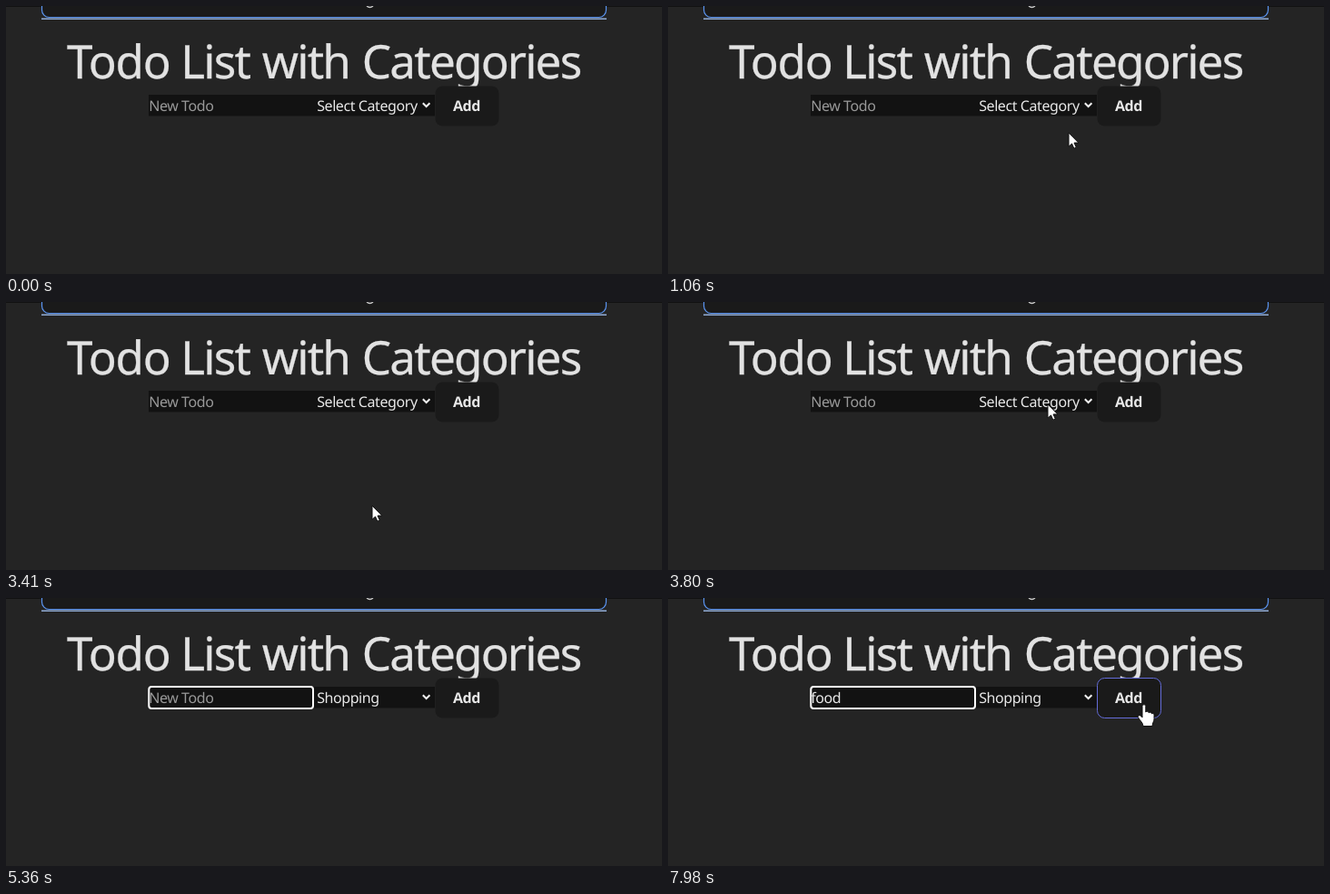
An HTML page for the animation above (8000 ms loop, 722 px wide and 296 px high).

```html
<!DOCTYPE html>
<html lang="en">
<head>
<meta charset="utf-8">
<title>Todo List with Categories</title>
<style>
  html, body { margin: 0; width: 100%; height: 100%; overflow: hidden; background: #242424; }
  svg { display: block; width: 722px; height: 296px; }
  text {
    font-family: "Noto Sans", "Open Sans", sans-serif;
    font-size: 16px;
    letter-spacing: -.42px;
    fill: #e8e8e8;
    text-rendering: geometricPrecision;
    white-space: pre;
  }
  .title { font-size: 51.2px; letter-spacing: -1.8px; fill: #e2e2e2; stroke: #e2e2e2; stroke-width: .3px; }
  .add { font-family: "Open Sans", "Noto Sans", sans-serif; font-weight: 700; letter-spacing: -.5px; }
  .ring { fill: none; stroke: #fff; stroke-width: 2; }
  .pointer { fill: #fff; stroke: #111; stroke-width: 1; stroke-linejoin: round; }
</style>
</head>
<body>
<svg viewBox="0 0 722 296">
  <rect width="722" height="296" fill="#242424"/>
  <rect width="722" height="1" fill="#111"/>

  <rect x="39.5" y="-30" width="621" height="42.5" rx="8" fill="#1a1a1a" stroke="#5a94f0" stroke-width="1.2"/>
  <path d="M397 0q3.5 3 7 0" fill="none" stroke="#ccc" stroke-width="1.3"/>
  <rect x="39" y="13.5" width="622" height="1.3" fill="#a4c4f4"/>

  <text class="title" y="80.2">
    <tspan x="67" letter-spacing="-1.2">Todo</tspan><tspan x="192.3">List</tspan><tspan x="281.8">with</tspan><tspan x="391.8">Categories</tspan>
  </text>

  <rect x="157" y="98" width="315" height="23.5" fill="#121212"/>
  <rect id="inputRing" class="ring" x="157.3" y="98" width="180.7" height="24" rx="3"/>
  <rect id="selectRing" class="ring" x="338.5" y="98" width="132.5" height="23" rx="3"/>
  <text id="entry" x="157.2" y="116"></text>
  <rect id="caret" y="101" width="1" height="18" fill="#e4e4e4"/>
  <text id="category" x="342.2" y="116"></text>
  <path d="M458.8 107.2l3.8 3.8 3.8-3.8" fill="none" stroke="#eee" stroke-width="2"/>

  <rect id="button" x="472.5" y="88.5" width="70" height="44" rx="8" fill="#1a1a1a"/>
  <text class="add" x="492" y="116">Add</text>

  <path id="arrow" class="pointer" d="M0 0V15.2L3.5 12L5.8 17.2L8.3 16.1L6 11H10.8Z"/>
  <path id="hand" class="pointer" d="M-2 1.5C-2 -.7 1.8 -.7 1.8 1.5V8C2.8 6.8 5 7.2 5.2 8.8C6.4 7.6 8.2 8.2 8.3 9.8C9.6 8.9 11 9.6 11 11.4V15.5C11 18.5 9.2 19.5 9 23.5H-1C-1.2 20 -4 18 -6.6 13.8C-7.6 11.8 -4.6 10.8 -3.2 12.6L-2 14Z"/>
</svg>
<script>
  const LOOP = 8000;
  const el = id => document.getElementById(id);
  const [inputRing, selectRing, entry, caret, category, button, arrow, hand] =
    ["inputRing", "selectRing", "entry", "caret", "category", "button", "arrow", "hand"].map(el);

  // Each step: start time, value
  const typed = [[0, ""], [5850, "f"], [6100, "fo"], [6260, "foo"], [7130, "food"]];
  const focus = [[0, ""], [3880, "select"], [4810, "input"]];
  const choice = [[0, "Select Category"], [4340, "Shopping"]];
  const caretOn = [[0, false], [4810, true], [5360, false], [5850, true], [6790, false], [7130, true], [7660, false]];
  const caretX = [157.6, 162.2, 171.6, 181, 190.4];

  // Pointer paths: time, x, y; hidden outside the first and last time
  const arrowPaths = [
    [[170, 392, 277], [500, 408, 222], [800, 430, 160], [970, 441, 140], [1060, 441, 140],
     [1240, 446, 154], [1480, 446, 119], [2440, 446, 119], [2570, 448, 118]],
    [[3410, 403, 225], [3480, 403, 225], [3780, 418, 113], [4000, 418, 113]]
  ];
  const handPaths = [[[7560, 502, 125], [7700, 512, 123], [7840, 522, 121], [7980, 524, 118], [8001, 524, 118]]];

  const at = (steps, t) => steps.findLast(([start]) => start <= t)[1];
  const show = (node, on) => { node.style.display = on ? "" : "none"; };

  function place(node, paths, t) {
    const path = paths.find(p => t >= p[0][0] && t < p.at(-1)[0]);
    show(node, path);
    if (!path) return;
    const i = path.findIndex(p => p[0] > t);
    const [t0, x0, y0] = path[i - 1], [t1, x1, y1] = path[i];
    const k = (t - t0) / (t1 - t0);
    node.setAttribute("transform", `translate(${x0 + (x1 - x0) * k} ${y0 + (y1 - y0) * k})`);
  }

  function draw(t) {
    const word = at(typed, t), field = at(focus, t);
    entry.textContent = word || "New Todo";
    entry.style.fill = word ? "#e8e8e8" : "#999";
    category.textContent = at(choice, t);
    show(inputRing, field === "input");
    show(selectRing, field === "select");
    show(caret, at(caretOn, t));
    caret.setAttribute("x", caretX[word.length]);
    button.setAttribute("stroke", t >= 7560 ? "#646cd8" : "none");
    place(arrow, arrowPaths, t);
    place(hand, handPaths, t);
  }

  const began = performance.now();
  function tick() {
    draw((performance.now() - began) % LOOP);
    requestAnimationFrame(tick);
  }
  draw(0);
  requestAnimationFrame(tick);
</script>
</body>
</html>
```
